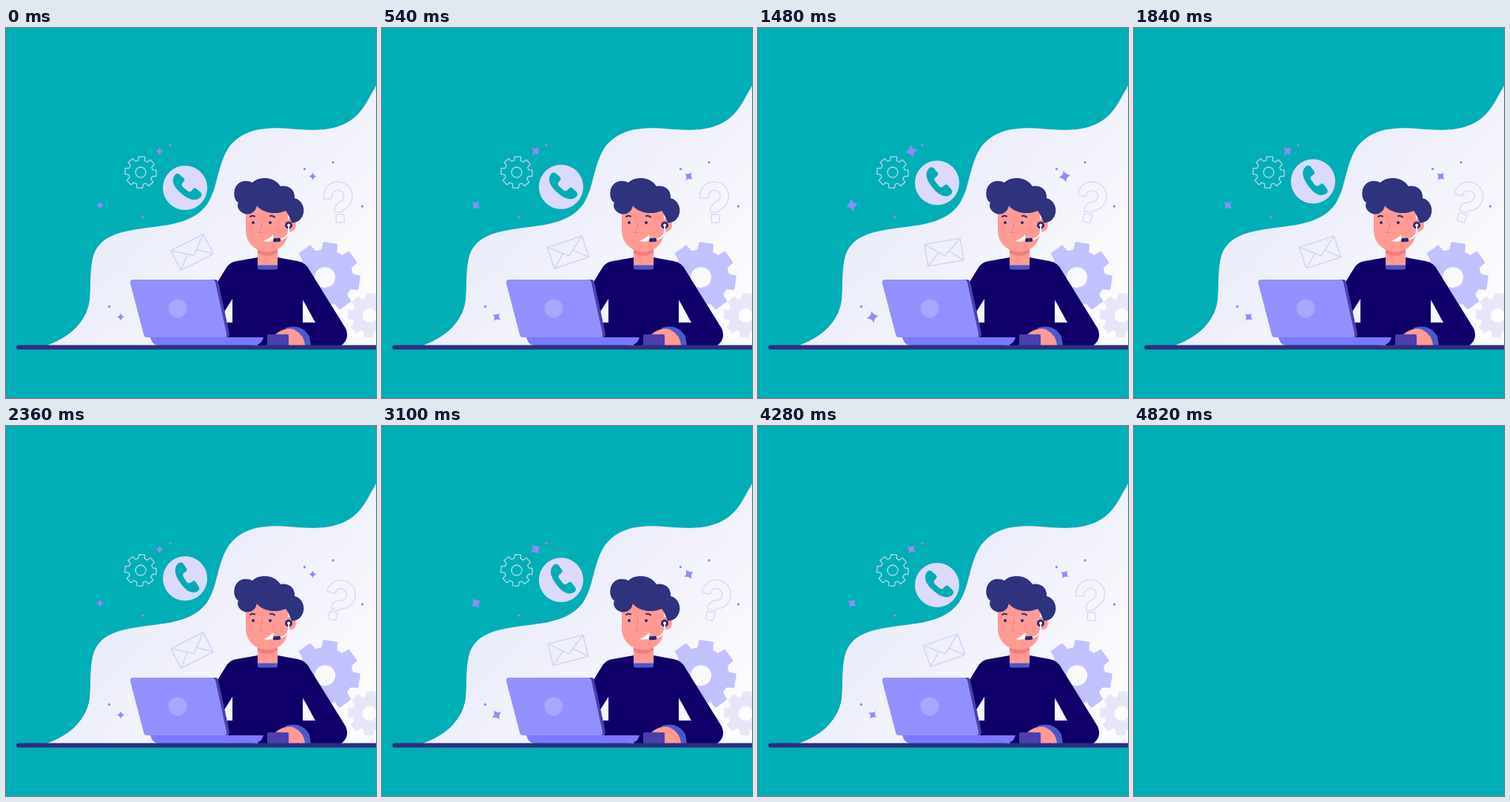
Write an HTML page that moves like this. It is 500 px wide and 500 px high and loops after 4840 ms.

```html
<!DOCTYPE html>
<html lang="en">
<head>
<meta charset="utf-8">
<title>Support desk</title>
<style>
  html, body { margin: 0; width: 100%; height: 100%; overflow: hidden; background: #00aeb6; }
  svg { display: block; width: 100vw; height: 100vh; }
</style>
</head>
<body>
<svg viewBox="0 0 500 500">
  <defs>
    <linearGradient id="wall" gradientUnits="userSpaceOnUse" x1="190" y1="230" x2="430" y2="470">
      <stop offset="0" stop-color="#eaecf9"/>
      <stop offset=".55" stop-color="#f5f5fc"/>
      <stop offset="1" stop-color="#fefeff"/>
    </linearGradient>
  </defs>
  <g id="scene">
    <path fill="url(#wall)" d="M55 429C80 420 108 402 113 368C115 345 113 330 117 312C124 280 155 275 190 270C225 266 255 262 272 238C287 215 285 185 302 160C320 138 345 134 375 135.500C415 139 450 142 475 117C485 107 492 92 500 78V429Z"/>

    <g id="gears" fill-rule="evenodd"></g>
    <g id="dots" fill="#8f8cf8"></g>
    <g id="stars" fill="#8f8cfa"></g>

    <g id="mail" fill="none" stroke="#d5d3f5" stroke-width="1.6" stroke-linejoin="round">
      <rect x="-24.500" y="-15" width="49" height="30" rx="1"/>
      <path d="M-24 -14.500L0 5L24 -14.500M-24 14.500L-7 -0.500M24 14.500L7 -0.500"/>
    </g>
    <g id="ask" fill="none" stroke="#dcdaf6" stroke-width="1.6">
      <path d="M-19.500 -8A19.500 19.500 0 1 1 8 9Q5 10.500 5 12Q5 13 4 13H-5Q-6.500 13 -6.500 11Q-6.500 2 2 -1A8 8 0 1 0 -8 -8Q-8.500 -6.500 -10 -6.500H-18Q-19.500 -6.500 -19.500 -8Z"/>
      <rect x="-5.500" y="16" width="11" height="11" rx="2"/>
    </g>
    <g id="call">
      <circle r="30" fill="#dcdafa"/>
      <path id="handset" fill="#00adb5" d="M-23 -3Q-23 -8 -18 -8H-11Q-8 -8 -8 -4V-1Q-7 2 -4 2H4Q7 2 8 -1V-4Q8 -8 11 -8H18Q23 -8 23 -3C22 7 12 10 0 10C-12 10 -22 7 -23 -3Z"/>
    </g>

    <!-- agent -->
    <path fill="#0e0068" fill-rule="evenodd" d="M286 343L299 322Q304 316 312 315L340 310H367L394 315Q405 317 410 327L459 406Q465 420 453 429H340V418H300L299 398H306V366L294 385ZM401 367V398H418Z"/>
    <path fill="#ff9b94" d="M340 292H367V322H340Z"/>
    <path fill="#f47c80" d="M340 299Q354 306 367 299V303Q360 309 350 308Q344 307 340 304Z"/>
    <path fill="#4d57c8" d="M340 320.500H367V324Q367 326.500 364 326.500H343Q340 326.500 340 324Z"/>
    <ellipse cx="384" cy="266.500" rx="8" ry="9" fill="#ff9b94"/>
    <path fill="#ff9b94" d="M324 238V275C325 292 338 302 352 302C372 302 380 290 381 275V238Z"/>
    <path fill="#2f327d" d="M314 236C306 232 305 210 321 207C327 206 331 208 333 209C342 200 362 200 371 214C380 212 391 217 390 230C399 232 404 242 402 250C400 260 392 264 386 263C384 258 382 252 378 247C365 253 346 250 339 240C337 250 328 254 320 250C313 246 312 240 314 236Z"/>
    <g fill="#2b2b78">
      <circle cx="334" cy="263" r="2"/>
      <circle cx="357" cy="263" r="2"/>
    </g>
    <g fill="none" stroke-linecap="round">
      <path stroke="#2b2b78" stroke-width="2" d="M330 255Q333 253 336 254.500M357 254Q360 253 363 255.500"/>
      <path stroke="#ee7d85" stroke-width="1" d="M346 261Q346 271 341.500 276.500H347"/>
      <path stroke="#fff" stroke-width="1.800" d="M382 268Q384 283 370 286"/>
    </g>
    <path fill="#fff" d="M348 287.500Q356 285 361 279Q363 284 360 287.500Q354 290 348 287.500Z"/>
    <rect x="361" y="284" width="10" height="5" rx="1.500" fill="#2b2b78" transform="rotate(-5 366 286)"/>
    <circle cx="382" cy="266.500" r="5" fill="#2b2b78"/>
    <path d="M382 266V274" stroke="#fff" stroke-width="2"/>
    <circle cx="382" cy="266.500" r="2" fill="#fff"/>

    <!-- desk items -->
    <path fill="#4d5acb" d="M378 405Q400 399 410 417L412 429H380Z"/>
    <path fill="#ff9b94" d="M364 414Q376 404 388 407Q403 414 404 429H378Z"/>
    <rect x="353" y="414" width="29" height="16" rx="2" fill="#4b3fae"/>
    <path fill="#7b79ff" d="M195 418H348Q345 429 334 429H206Q198 429 195 418Z"/>
    <path fill="#4b3fae" d="M276 340H283Q286 340 287 344L302 413Q302 418 297 418H285Z"/>
    <path fill="#9290ff" d="M172 340H279Q282 340 283 344L298 413Q299 418 295 418H190Q187 418 186 414L168 345Q167 340 172 340Z"/>
    <circle cx="232" cy="379" r="12.500" fill="#a9a6ff"/>
    <path d="M17 431.500H503" stroke="#2f2f7e" stroke-width="6" stroke-linecap="round"/>
  </g>
</svg>
<script>
  const LOOP = 4840, CYCLE = 4800, VISIBLE = 4820;
  const $ = id => document.getElementById(id);

  function add(parent, tag, attrs) {
    const el = document.createElementNS("http://www.w3.org/2000/svg", tag);
    for (const k in attrs) el.setAttribute(k, attrs[k]);
    return parent.appendChild(el);
  }

  function gear(x, y, outer, root, hole, turn, paint) {
    const step = Math.PI / 4, pts = [];
    const put = (r, a) => pts.push((r * Math.cos(a)).toFixed(2) + " " + (r * Math.sin(a)).toFixed(2));
    for (let i = 0; i < 8; i++) {
      const a = i * step;
      put(root, a - step * .34);
      put(outer, a - step * .24);
      put(outer, a + step * .24);
      put(root, a + step * .34);
    }
    const ring = `M${-hole} 0a${hole} ${hole} 0 1 0 ${2 * hole} 0a${hole} ${hole} 0 1 0 ${-2 * hole} 0Z`;
    add($("gears"), "path", {
      d: `M${pts.join("L")}Z${ring}`,
      transform: `translate(${x} ${y}) rotate(${turn})`,
      "stroke-linejoin": "round",
      ...paint
    });
  }

  gear(431, 337, 47, 37, 15, 9, { fill: "#c1c1ff", stroke: "#c1c1ff", "stroke-width": 2 });
  gear(491.5, 388.5, 29.5, 23, 10.5, 3, { fill: "#e7e6f8", stroke: "#e7e6f8", "stroke-width": 1.5 });
  gear(182, 195, 21.5, 16.5, 7, 4, { fill: "none", stroke: "#b4dcee", "stroke-width": 1.3 });

  [[222, 158.5], [185, 256], [139.5, 376.5], [403.5, 190.5], [442, 181.5], [481.5, 241]]
    .forEach(([cx, cy]) => add($("dots"), "circle", { cx, cy, r: 1.7 }));

  const stars = [[207.5, 166.5, 9.3], [127, 239.5, 9.3], [155, 390.5, 8.6], [414.5, 200.5, 8.6]].map(([x, y, r]) => ({
    x, y, r,
    el: add($("stars"), "path", { d: "M0 -1Q.2 -.2 1 0Q.2 .2 0 1Q-.2 .2 -1 0Q-.2 -.2 0 -1Z" })
  }));

  // Eased swing: 0 at rest, 1 halfway through the period.
  const swing = (t, period) => (1 - Math.cos(2 * Math.PI * t / period)) / 2;
  const place = (el, x, y, turn = 0, size = 1) =>
    el.setAttribute("transform", `translate(${x} ${y}) rotate(${turn}) scale(${size})`);

  function draw(t) {
    $("scene").style.visibility = t < VISIBLE ? "visible" : "hidden";
    const slow = swing(t, CYCLE), fast = swing(t, CYCLE / 2);
    place($("call"), 242, 216 - 10 * slow);
    place($("handset"), 1.5, 0, 40 + 16 * slow);
    place($("ask"), 449.5, 236, -6 + 27 * slow);
    place($("mail"), 251.5, 303, -27 + 20.5 * fast);
    for (const s of stars) place(s.el, s.x, s.y, 90 * fast, s.r * (.6 + .4 * fast));
  }

  const start = performance.now();
  function tick() {
    draw((performance.now() - start) % LOOP);
    requestAnimationFrame(tick);
  }
  tick();
</script>
</body>
</html>
```
